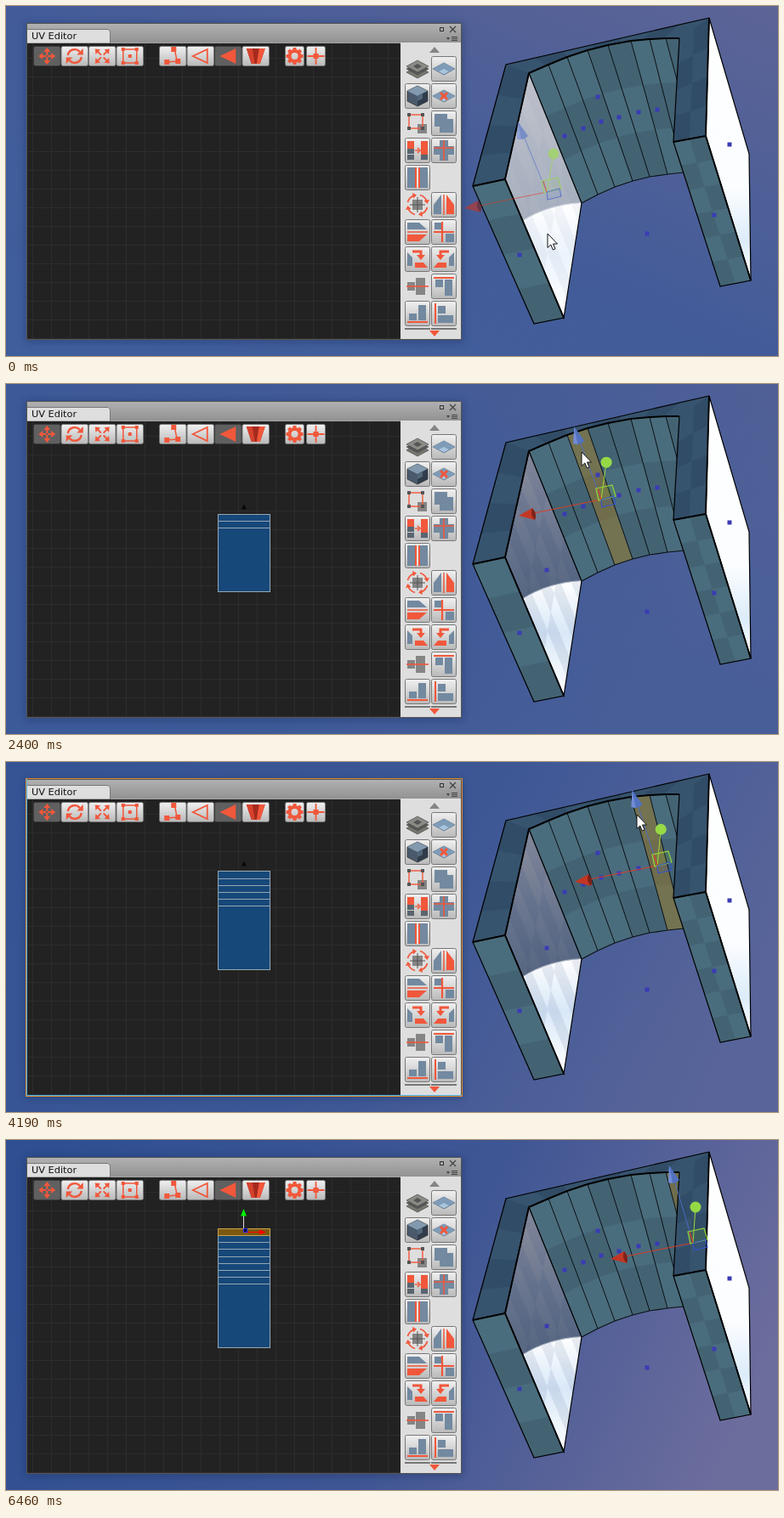
An HTML page for the animation above (6.8 s loop, 908 by 412 pixels).

```html
<!DOCTYPE html>
<html lang="en">
<head>
<meta charset="utf-8">
<title>UV Editor</title>
<style>
html, body { margin: 0; width: 100%; height: 100%; overflow: hidden; background: #455b97; }
svg { display: block; width: 908px; height: 412px; }
</style>
</head>
<body>
<svg id="stage" viewBox="0 0 908 412" xmlns="http://www.w3.org/2000/svg"></svg>
<script>
const LOOP = 6800;
const ORANGE = '#f1573b', STEEL = '#7289a0', GRAY = '#858585';

// ---- markup helpers ----
const rect = (x, y, w, h, fill, extra = '') =>
  `<rect x="${x}" y="${y}" width="${w}" height="${h}" fill="${fill}" ${extra}/>`;
const path = (d, fill = 'none', stroke = 'none', width = 1, extra = '') =>
  `<path d="${d}" fill="${fill}" stroke="${stroke}" stroke-width="${width}" ${extra}/>`;
const poly = (pts, fill = 'none', stroke = 'none', width = 1, extra = '') =>
  path('M' + pts.map(p => p.map(v => +v.toFixed(1)).join(' ')).join('L') + 'Z', fill, stroke, width, extra);
const at = (x, y, body) => `<g transform="translate(${x} ${y})">${body}</g>`;
const mix = (a, b, k) => a.map((v, i) => v + (b[i] - v) * k);
const ramp = (t, from, to) => Math.min(1, Math.max(0, (t - from) / (to - from)));
const gradient = (id, coords, ...stops) => `<linearGradient id="${id}" ${coords}>` +
  stops.map(([o, c]) => `<stop offset="${o}" stop-color="${c}"/>`).join('') + '</linearGradient>';
const DOWN = 'x1="0" y1="0" x2="0" y2="1"';

// Checkered quad, corners in order around the outline
function checker([a, b, c, d], cols, rows, fills, phase = 0) {
  let out = '';
  const point = (u, v) => mix(mix(a, b, u), mix(d, c, u), v);
  for (let i = 0; i < cols; i++) for (let j = 0; j < rows; j++) {
    const [u, U, v, V] = [i / cols, (i + 1) / cols, j / rows, (j + 1) / rows];
    const fill = fills[(i + j + phase) % 2];
    out += poly([point(u, v), point(U, v), point(U, V), point(u, V)], fill, fill, .4);
  }
  return out;
}

// ---- arch ----
const TOP = [[615,79],[638,69],[660,60],[684,52],[708,46],[735,41],[757,39],[776,38],[797,38]];
const BOTTOM = [[677,232],[696,222],[716,213],[737,206],[757,201],[778,198],[797,196],[818,195],[838,195]];
const TEAL = ['#4a6d7d', '#436373'], NAVY = ['#37546f', '#314c66'];
const WALL = [[615,79],[677,232],[656,367],[587,204]];
const SHADE = 'M615 79L677 232Q638 234 608 253L587 204Z';
const LIT = 'M677 232Q638 234 608 253L656 367Z';
const strip = i => [TOP[i - 1], TOP[i], BOTTOM[i], BOTTOM[i - 1]];
const curve = pts => 'M' + pts.map(p => p.join(' ')).join('L');

function arch() {
  const outer = [588,69], peak = [827,14], knee = [587,204], foot = [549,212];
  const lip = [792,38], hip = [785,160], hem = [823,153];
  let out = checker([outer, peak, lip, TOP[0]], 7, 1, NAVY) +
    checker([outer, TOP[0], knee, foot], 1, 4, NAVY, 1);
  for (let i = 1; i <= 8; i++) {
    out += checker(strip(i), 1, 3, TEAL, Math.max(0, (i >> 1) - 1)) +
      poly(strip(i), '#fff', 'none', 0, `id="tint${i}"`);
  }
  for (let i = 0; i <= 8; i++) out += path(curve([TOP[i], BOTTOM[i]]), 'none', '#0b1014', 1);
  out += path(curve(BOTTOM), 'none', '#0b1014', 1.2) + path(curve(TOP.slice(0, 8)) + 'L792 38', 'none', '#000', 2);

  // left leg
  out += path(LIT, 'url(#lit)') + path(SHADE, 'url(#shade)') +
    `<g opacity=".09">${checker(WALL, 3, 6, ['#1c3b70', 'none'])}</g>` +
    path('M677 232Q638 234 608 253', 'none', '#fff', 2, 'opacity=".45"') +
    path(LIT, '#fff', 'none', 0, 'id="tintLit"') + path(SHADE, '#fff', 'none', 0, 'id="tint0"') +
    poly(WALL, 'none', '#000', 1.2) +
    checker([foot, knee, [656,367], [621,374]], 1, 4, TEAL) +
    poly([foot, knee, [656,367], [621,374]], 'none', '#000', 1.2);

  // right leg
  out += poly([peak, [874,174], [876,323], hem], 'url(#side)', '#000', 1.2) +
    checker([lip, peak, hem, hip], 2, 4, NAVY) +
    checker([hip, hem, [876,323], [840,330]], 2, 6, TEAL) +
    poly([hip, hem, [876,323], [840,330]], 'none', '#000', 1.2);

  const lines = [curve([foot, outer, peak]), curve([lip, hip])];
  const heavy = [curve([foot, knee, TOP[0]]), curve([hip, hem, peak]), curve([knee, [656,367]]), curve([hem, [876,323]])];
  return out + path(lines.join(''), 'none', '#000', 1.2) + path(heavy.join(''), 'none', '#000', 1.9);
}

// Centre handle of each face: wall first, then the strips
const CENTERS = [[636,219],[657,153],[679,144],[700,136],[721,131],[744,125],[766,122],[787,121],[808,121]];
const LOOSE = [[696,107],[604,293],[754,268],[833,246],[851,163]];
const dot = ([x, y], id = '') => rect(x - 2.5, y - 2.5, 5, 5, '#3a3cb4', id);

// ---- toolbar icons, each centred on 0,0 ----
const nodes = (pts, s = 4) => pts.map(([x, y]) => rect(x - s / 2, y - s / 2, s, s, ORANGE)).join('');
const corners = d => [[-d,-d],[d,-d],[d,d],[-d,d]];
const spin = (angles, body) => angles.map(a => `<g transform="rotate(${a})">${body}</g>`).join('');
const QUARTERS = [0, 90, 180, 270];
const turns = d => spin(QUARTERS, path(d, ORANGE));
const rotateArrows = spin([0, 180],
  path('M-8 -1A8 8 0 0 1 6 -5', 'none', ORANGE, 2.4) + path('M10 -9v7.500h-7.500z', ORANGE));
const ringArrows = spin(QUARTERS,
  path('M-11.500 -3A12 12 0 0 1 -4 -11', 'none', ORANGE, 1.8) + path('M-6 -14l5 2.500l-4 4z', ORANGE));
const diamond = (y, fill, stroke = '#555') => path(`M-13 ${y}L0 ${y - 7}L13 ${y}L0 ${y + 7}Z`, fill, stroke, .8);
const tiles = diamond(0, '#a9c4dd', '#53687b') + path('M-6.5 -3.5L0 0L-6.5 3.5L-13 0ZM6.5 -3.5L13 0L6.5 3.5L0 0ZM0 -7l6.5 3.5L0 0l-6.5 -3.5Z', '#7e9cb8');

const toolIcons = {
  move: turns('M0 -10l4 5h-3v4h-2v-4h-3z'),
  rotate: rotateArrows,
  scale: spin([45], turns('M0 -12l4 5h-3v5h-2v-5h-3z')),
  box: rect(-8, -8, 16, 16, 'none', `stroke="${ORANGE}" stroke-width="1.5"`) + nodes([...corners(8), [0, 0]]),
  vertex: path('M2 -8L5 6L-7 7', 'none', ORANGE, 1.5) + nodes([[1, -8], [6, 6], [-7, 7]], 6),
  edge: path('M-9 0L8 -8V8Z', 'none', ORANGE, 1.8),
  face: path('M-10 0L9 -9V9Z', ORANGE),
  solid: path('M-11 -9H11L5 9H-5Z', '#a52a1d') + path('M-11 -9H-4L-1 9H-5Z', '#d5422d') + path('M4 -9h7L5 9H1Z', ORANGE),
  gear: `<circle r="6" fill="none" stroke="${ORANGE}" stroke-width="4"/>` + spin([0, 45], turns('M-2 -10h4v4h-4z')),
  cross: path('M0 -10V10M-10 0H10', 'none', ORANGE, 1.8) + nodes([[0, 0]], 6)
};

const bent = path('M-6 -9H4v5', 'none', ORANGE, 3) + path('M-1 -5h10l-5 6z', ORANGE) +
  path('M-12 -8l6 6V8h-6z', STEEL) + path('M-3 4H7l5 6H-3z', ORANGE);
const sideIcons = [
  [0, diamond(4, '#77776f') + diamond(0, '#555') + diamond(-3, '#8b8b86') + path('M-5 -3l5 -3 5 3 -5 3z', '#555')],
  [1, tiles],
  [1, path('M0 -12L12 -6V6L0 12L-12 6V-6Z', '#4a5a6c', '#333', .8) + path('M0 -12L12 -6L0 0L-12 -6Z', '#8299ae') +
    path('M0 0V12L12 6V-6Z', '#303c4a') + path('M0 0v6l6 -3v-6z', '#52667a')],
  [1, tiles + path('M-4 -4L4 4M4 -4L-4 4', 'none', ORANGE, 3)],
  [0, rect(0, 1, 11, 11, GRAY) + rect(-10, -10, 16, 16, 'none', `stroke="${ORANGE}" stroke-width="1.4"`) +
    [[-10,-10],[6,-10],[6,6],[-10,6]].map(([x, y]) => rect(x - 2, y - 2, 4, 4, '#555')).join('')],
  [1, path('M-11 -11H4V-5H11V11H-5V4H-11Z', STEEL)],
  [1, rect(-12, -11, 8, 9, ORANGE) + rect(-12, -2, 8, 6, '#596570') + rect(-12, 5, 8, 6, '#596570') +
    rect(4, -11, 8, 22, ORANGE) + rect(4, 5, 8, 6, '#596570') + path('M-3 0H1M0 -3l3 3 -3 3', 'none', ORANGE, 1.6)],
  [1, path('M-5 -12H5V-5H12V5H5V12H-5V5H-12V-5H-5Z', STEEL) + path('M0 -12V12M-12 -3H12', 'none', ORANGE, 1.6)],
  [1, rect(-12, -12, 24, 24, STEEL) + rect(-3, -12, 6, 24, '#e5e5e5') + path('M-2 -12V12M2 -12V12', 'none', ORANGE, 2)],
  null,
  [0, rect(-6, -6, 12, 12, GRAY) + path('M0 -9V9M-9 0H9', 'none', '#555', 1) + ringArrows],
  [1, path('M-3 -12V11H-12V0Z', STEEL) + path('M3 -12V11H12V0Z', ORANGE) + path('M0 -12V12', 'none', ORANGE, 1.5)],
  [1, path('M-12 -3V-11H2L11 -3Z', STEEL) + path('M-12 3V11H2L11 3Z', ORANGE) + path('M-12 0H12', 'none', ORANGE, 1.5)],
  [1, rect(-11, -11, 8, 8, STEEL) + rect(2, 2, 10, 10, STEEL) + path('M-2 -12V12M-12 0H12', 'none', ORANGE, 2.2)],
  [1, bent],
  [1, `<g transform="scale(-1 1)">${bent}</g>`],
  [0, rect(-12, -5, 9, 10, GRAY) + rect(-2, -10, 11, 20, GRAY) + path('M-13 0H13', 'none', ORANGE, 1.6)],
  [1, rect(-10, -8, 9, 9, STEEL) + rect(1, -8, 9, 19, STEEL) + path('M-12 -10H12', 'none', ORANGE, 2)],
  [1, rect(-10, 0, 9, 8, STEEL) + rect(1, -10, 9, 18, STEEL) + path('M-12 10H12', 'none', ORANGE, 2)],
  [1, rect(-7, -9, 9, 9, STEEL) + rect(-7, 2, 18, 9, STEEL) + path('M-10 -12V12', 'none', ORANGE, 2)]
];

const button = (x, y, w, h, pressed) =>
  rect(x + .5, y + .5, w - 1, h - 1, pressed ? '#606060' : 'url(#button)', `rx="2" stroke="${pressed ? '#3a3a3a' : '#777'}"`);

function tools(x, width, names, pressed) {
  return names.map((name, i) => button(x + i * width, 47, width, 24, name === pressed) +
    at(x + (i + .5) * width, 59, toolIcons[name])).join('');
}

function editor() {
  let grid = '';
  for (let x = 31.5; x < 464; x += 22) grid += `M${x} 44V392`;
  for (let y = 61.5; y < 392; y += 22) grid += `M25 ${y}H464`;
  const side = sideIcons.map((icon, i) => {
    if (!icon) return '';
    const x = 484 + (i % 2) * 31, y = 74 + (i >> 1) * 32;
    return (icon[0] ? button(x - 15, y - 15, 30, 30) : '') + at(x, y, icon[1]);
  }).join('');
  return rect(22, 20, 516, 376, '#10204a', 'opacity=".3" rx="4" filter="url(#blur)"') +
    rect(24, 20, 512, 373, '#a3a3a3') + rect(24, 20, 512, 23, 'url(#title)') +
    path('M24.5 44V27.500H120L122.500 30V44Z', '#dedede', '#777', 1) +
    `<text x="30" y="39" font-family="'DejaVu Sans', sans-serif" font-size="11.3" fill="#111">UV Editor</text>` +
    rect(510.5, 25.5, 4, 4, 'none', 'stroke="#333"') + path('M522 24l7 7M529 24l-7 7', 'none', '#444', 1.3) +
    path('M524 36.500h7M524 38.500h7M524 40.500h7', 'none', '#444', 1) + path('M518 37h4l-2 3z', '#444') +
    rect(25, 44, 439, 348, '#222') + path(grid, 'none', '#2d2d2d', 1) +
    rect(464, 43, 71, 349, '#dedede') +
    tools(32, 32.5, ['move', 'rotate', 'scale', 'box'], 'move') +
    tools(180, 32.5, ['vertex', 'edge', 'face', 'solid'], 'face') +
    tools(328, 23, ['gear']) + tools(353, 23, ['cross']) +
    side + rect(469, 379, 30, 2, '#777') + rect(500, 379, 30, 2, '#777') +
    path('M498 55h12l-6 -7z', '#858585') + path('M498 382h12l-6 7z', ORANGE) +
    rect(24.5, 20.5, 511, 372, 'none', 'stroke="#555"');
}

// ---- stage ----
const stage = document.getElementById('stage');
const sky = (name, id) => rect(0, 0, 908, 412, `url(#${name})`, `id="${id}"`);
stage.innerHTML = '<defs><filter id="blur"><feGaussianBlur stdDeviation="4"/></filter>' +
  gradient('dawn', 'x1="0" y1="1" x2="1" y2="0"', [0, '#3f5e9c'], [.5, '#435c99'], [1, '#5d6496']) +
  gradient('noon', 'x1="0" y1="0" x2="1" y2=".3"', [0, '#3a5796'], [.6, '#3c5896'], [1, '#4b5f98']) +
  gradient('dusk', 'x1="0" y1=".4" x2="1" y2=".6"', [0, '#2f4f92'], [.55, '#3f5694'], [1, '#6d6d9d']) +
  gradient('title', DOWN, [0, '#b2b2b2'], [1, '#929292']) +
  gradient('button', DOWN, [0, '#f0f0f0'], [1, '#b9b9b9']) +
  gradient('shade', DOWN, [0, '#8e909f'], [.5, '#6d7890'], [1, '#566681']) +
  gradient('lit', DOWN, [0, '#ffffff'], [.45, '#d9e8f8'], [1, '#ffffff']) +
  gradient('side', DOWN, [0, '#ffffff'], [.65, '#fbfdff'], [.85, '#dcecfa'], [1, '#ffffff']) +
  '</defs>' + sky('dawn', 'skyDawn') + sky('noon', 'skyNoon') + sky('dusk', 'skyDusk') +
  editor() + '<g id="uv"></g><g id="frame"></g>' + arch() +
  CENTERS.slice(0, 7).map((p, i) => dot(p, `id="dot${i}"`)).join('') + LOOSE.map(p => dot(p)).join('') +
  '<g id="gizmo"></g>' + path('M0 0V16.500L3.800 13L6.300 19L9 17.800L6.500 12H11.500Z', '#fff', '#111', 1, 'id="cursor"');
const el = id => document.getElementById(id);

// ---- timeline ----
const CLICKS = [0, 1190, 1790, 2350, 3040, 3730, 4190, 4710, 5160];
const REFRESH = 60;
const CURSOR = [[0,637,268],[420,637,268],[540,653,119],[800,648,106],[1300,648,106],[1680,656,90],
  [1850,656,90],[2020,677,80],[2450,677,80],[2720,700,70],[3060,700,70],[3220,708,66],[3400,708,66],
  [3670,725,64],[3850,725,64],[4130,742,62],[4470,742,62],[4700,764,53],[4900,764,53],[5110,781,50],
  [5450,781,50],[5630,800,-30]];

function cursorAt(t) {
  const next = CURSOR.findIndex(k => k[0] > t);
  if (next < 0) return null;
  const a = CURSOR[next - 1], b = CURSOR[next];
  return mix(a, b, (t - a[0]) / (b[0] - a[0])).slice(1);
}

function faceUnder(point) {
  if (!point || point[1] < 38) return -1;
  const [x, y] = point;
  return TOP.findIndex((a, i) => x < a[0] + (BOTTOM[i][0] - a[0]) * (y - a[1]) / (BOTTOM[i][1] - a[1]));
}

function uvMarkup(count, active) {
  const edge = i => i < 0 ? 244.5 : Math.floor(169.5 - 8.12 * i) + .5;
  let out = '';
  for (let i = 0; i <= count; i++) {
    const on = active && i === count;
    out += rect(249.5, edge(i), 61, edge(i - 1) - edge(i), on ? '#7b5811' : '#17487a',
      `stroke="${on && i > 3 ? '#c9a54a' : '#95a6b2'}"`);
  }
  if (count < 0) return out;
  const y = edge(count);
  if (!active) return out + path(`M277 ${y - 6}l3 -6l3 6z`, '#080808');
  const cy = Math.floor((y + edge(count - 1)) / 2) + .5;
  return out + path(`M279.500 ${cy}V${cy - 20}`, 'none', '#ddd', 1) + path(`M276 ${cy - 19}h7l-3.500 -8.500z`, '#00f000') +
    path(`M280 ${cy}H299`, 'none', '#f00', 1) + path(`M298 ${cy - 3}v6l8 -3z`, '#f00') +
    rect(279.5, cy - 4, 4, 4, '#111', 'stroke="#22f"');
}

function gizmoMarkup(i) {
  const k = i / 8;
  const [bx, by] = mix([-30, -73], [-24, -81], k), [gx, gy] = mix([8, -45], [3, -42], k);
  const line = (x, y, color) => path(`M0 0L${x} ${y}`, 'none', color, 1);
  return at(...CENTERS[i],
    line(bx, by, '#4a6cc8') + line(gx, gy, '#a0e040') + line(-84, 17, '#e03a24') +
    path('M-6 -13L13 -17L17 -4L-3 1Z', '#8fcf3022', '#96dc3a', 1.2) +
    path('M0 0L15 -4L17 5L1 9Z', '#2c50c022', '#3555c8', 1.2) + path('M0 0L-4 -13', 'none', '#e03a24', 1.2) +
    at(bx, by, path('M-4 -10L8 7Q2 13 -5 10Z', '#5272c6') + path('M-4 -10L0 11L-5 10Z', '#7590dc')) +
    `<circle cx="${gx}" cy="${gy}" r="6.500" fill="#9be044"/>` +
    at(-86, 17, path('M-11 2L5 -7Q11 0 8 7Z', '#c93420') + path('M5 -7Q11 0 8 7Q2 1 5 -7Z', '#7f1e14')));
}

function render(t) {
  const selected = CLICKS.filter(c => c <= t).length - 1;
  const pending = t - CLICKS[selected] < REFRESH;
  const point = cursorAt(t), hovered = faceUnder(point);
  const starting = t < REFRESH;

  el('skyNoon').setAttribute('opacity', ramp(t, 1400, 3000));
  el('skyDusk').setAttribute('opacity', ramp(t, 3500, 5200));
  el('uv').innerHTML = uvMarkup(pending ? selected - 1 : selected, !pending);

  const tint = (id, i, amber) => {
    const on = selected === i && !starting;
    el(id).setAttribute('fill', on ? '#927632' : '#fff');
    el(id).setAttribute('opacity', on ? amber : hovered === i ? .48 : 0);
  };
  for (let i = 0; i <= 8; i++) tint('tint' + i, i, .58);
  tint('tintLit', 0, .2);
  for (let i = 0; i < 7; i++) el('dot' + i).setAttribute('opacity', i === selected ? 0 : 1);

  el('gizmo').innerHTML = gizmoMarkup(selected);
  el('gizmo').setAttribute('opacity', starting ? .6 : .95);
  el('cursor').setAttribute('visibility', point ? 'visible' : 'hidden');
  if (point) el('cursor').setAttribute('transform', `translate(${point})`);

  const focus = t >= 4190 && t < 4250, outline = t >= 1680 && t < 1730;
  el('frame').innerHTML = focus
    ? rect(23.5, 19.5, 513, 374, 'none', 'stroke="#e08a2c"') + path('M24.500 20V392.500H536', 'none', '#45b4f2', 1)
    : outline ? rect(24.5, 20.5, 511, 372, 'none', 'stroke="#2f86d6" stroke-width="1.2"') : '';
}

const start = performance.now();
function tick() {
  render((performance.now() - start) % LOOP);
  requestAnimationFrame(tick);
}
tick();
</script>
</body>
</html>
```
